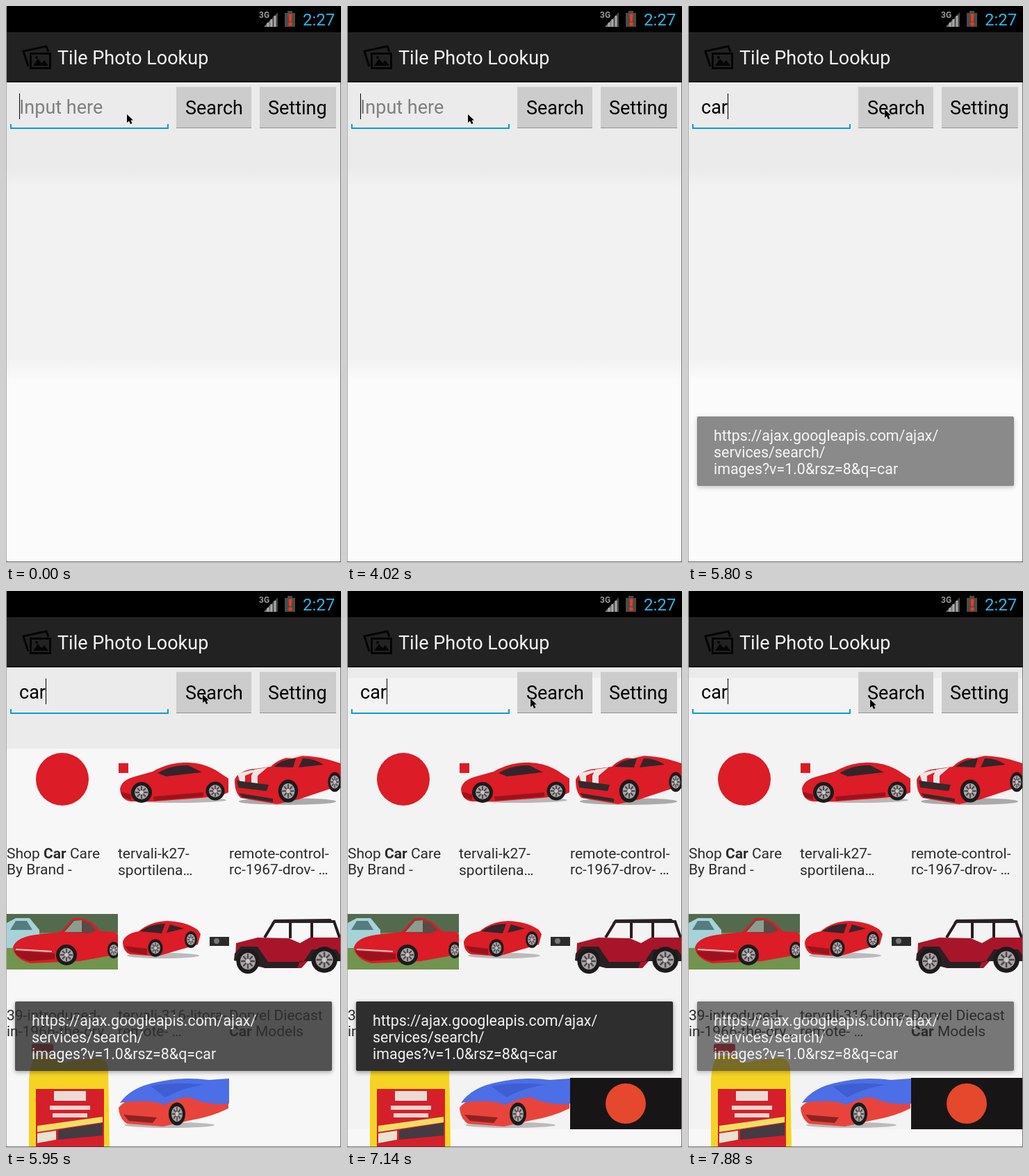
Animation of 482x802 px, one loop 8000 ms. Source, as an HTML page:

```html
<!DOCTYPE html>
<html lang="en">
<head>
<meta charset="utf-8">
<title>Image search</title>
<style>
  html, body { margin: 0; width: 100%; height: 100%; overflow: hidden; background: #fff; }
  svg { display: block; font: 27px Roboto, sans-serif; }
  .caption { font-size: 21px; fill: #2b2b2b; }
  .caption .bold { font-weight: 700; }
  .toast { font-size: 21.4px; fill: #f2f2f2; }
  .button { fill: #ccc; }
  .red { fill: #dc1c26; }
  .glass { fill: #33252a; }
  .shade { fill: #9c121c; }
</style>
</head>
<body>
<svg width="482" height="802" viewBox="0 0 482 802">
  <defs>
    <linearGradient id="page" x2="0" y2="1">
      <stop offset=".18" stop-color="#ebebeb"/>
      <stop offset=".217" stop-color="#f2f2f2"/>
      <stop offset=".577" stop-color="#f2f2f2"/>
      <stop offset=".623" stop-color="#fbfbfb"/>
    </linearGradient>
    <linearGradient id="signal">
      <stop offset=".5" stop-color="#777"/>
      <stop offset=".5" stop-color="#444"/>
    </linearGradient>
    <filter id="shadow" x="-5%" y="-10%" width="110%" height="125%">
      <feDropShadow dx="0" dy="2" stdDeviation="3" flood-opacity=".4"/>
    </filter>
    <g id="wheel">
      <circle r="15" fill="#1c1a1b"/>
      <circle r="10" fill="#a9a4a6"/>
      <path d="M-9 0H9M0-9V9M-6-6L6 6M-6 6L6-6" stroke="#4b4648" stroke-width="2"/>
      <circle r="3" fill="#c9c5c6"/>
    </g>
    <clipPath id="screen"><rect x="1" y="110" width="480" height="690"/></clipPath>
    <clipPath id="meadow"><rect x="1" y="465" width="160" height="80"/></clipPath>
  </defs>

  <rect y="110" width="482" height="690" fill="url(#page)"/>

  <g id="results" clip-path="url(#screen)">
    <rect x="1" y="227" width="480" height="573" fill="#f7f7f7"/>
    <rect id="backdrop" x="1" y="125" width="480" height="650" fill="#f3f3f3"/>

    <circle class="red" cx="81" cy="271" r="38"/>

    <!-- sports coupe -->
    <rect class="red" x="162" y="248" width="14" height="14"/>
    <ellipse cx="245" cy="301" rx="72" ry="4" fill="#b9b5b5"/>
    <path class="red" d="M164 285Q166 272 186 267L211 260Q235 246 262 247Q290 248 311 264L320 270V290L306 296L214 303H180Q165 301 164 285Z"/>
    <path class="glass" d="M218 262Q238 250 262 251L282 261L230 267Z"/>
    <path class="shade" d="M212 296L284 290V296L213 302ZM165 289L180 293V301L168 297Z"/>
    <use href="#wheel" x="195" y="290"/>
    <use href="#wheel" transform="translate(301 288) scale(.9)"/>

    <!-- striped muscle car -->
    <ellipse cx="405" cy="303" rx="70" ry="5" fill="#aaa"/>
    <path class="red" d="M329 272Q332 262 350 257L381 253Q394 239 421 237Q450 237 481 248V280L421 300L390 307L338 298Q329 291 329 272Z"/>
    <path class="glass" d="M385 253Q397 242 417 241L413 254ZM421 254L427 241Q444 241 457 250Z"/>
    <path d="M333 263L352 258H362L344 266V276H337ZM357 257L376 254L362 266V278H353V266ZM398 240L421 236H432L412 241Z" fill="#f0e5e5"/>
    <path d="M332 273L378 279L375 288L334 283ZM335 291L384 299V304L340 297Z" fill="#332a2b"/>
    <use href="#wheel" transform="translate(406 288) scale(.95 1.1)"/>
    <use href="#wheel" transform="translate(473 275) scale(.65 .95)"/>

    <!-- roadster on grass -->
    <g clip-path="url(#meadow)">
      <rect x="1" y="465" width="160" height="80" fill="#71944f"/>
      <rect x="1" y="465" width="160" height="27" fill="#536b4c"/>
      <path d="M1 478L14 471H34L48 488V514H1Z" fill="#a6d3d7"/>
      <path d="M6 488L14 475H30L38 488Z" fill="#557d80"/>
      <path class="red" d="M10 513Q14 499 42 495L78 491L97 471Q120 468 136 490L157 491L161 495V523L106 533L35 536Q12 530 10 513Z"/>
      <path d="M82 491L97 474Q118 471 130 489L118 493Z" fill="#594a44"/>
      <path d="M84 491L98 475L109 474V491Z" fill="#8b9d8e"/>
      <path class="shade" d="M12 518L70 522V530L34 533Q16 528 12 518Z"/>
      <path d="M14 516L66 519" stroke="#d6cccb" stroke-width="2"/>
      <use href="#wheel" x="87" y="524"/>
      <use href="#wheel" transform="translate(155 517) scale(.6 .8)"/>
    </g>

    <!-- toy car and its remote -->
    <ellipse cx="226" cy="525" rx="52" ry="4" fill="#bbb"/>
    <path class="red" d="M168 505Q172 493 191 490Q207 476 232 475Q259 476 276 488L280 494L276 509L218 526L178 523Q168 519 168 505Z"/>
    <path class="glass" d="M193 490Q208 479 229 479L224 493ZM231 492L236 480L256 486Z"/>
    <path class="shade" d="M170 511L203 515V524L178 520Z"/>
    <use href="#wheel" transform="translate(215 514) scale(.7 .85)"/>
    <use href="#wheel" transform="translate(266 502) scale(.6 .8)"/>
    <rect x="293" y="498" width="28" height="13" fill="#2c2b2c"/>
    <circle cx="303" cy="504" r="4" fill="#777"/>

    <!-- off-roader -->
    <path d="M372 499L386 476H472L480 499M409 476V500M440 476V500" fill="none" stroke="#271c1e" stroke-width="4"/>
    <path d="M386 473L467 472L473 478H382Z" fill="#292225"/>
    <path d="M331 507L362 499L407 500L423 507L437 499H481V527L435 532L425 543H374L330 529Z" fill="#a8152a"/>
    <path d="M329 522L338 512H362L377 534H428L440 516H475L481 524V533H423L419 543H373L328 532Z" fill="#2a2023"/>
    <use href="#wheel" transform="translate(348 533) scale(1.1 1.2)"/>
    <use href="#wheel" transform="translate(458 531) scale(1.25)"/>

    <!-- yellow bottle -->
    <path d="M33 800V704Q34 682 42 669H66Q78 684 96 676L132 672Q146 674 147 688L149 800Z" fill="#f5d323"/>
    <rect x="37" y="652" width="31" height="13" rx="3" fill="#c92732"/>
    <rect x="43" y="717" width="98" height="83" fill="#d5202b"/>
    <rect x="69" y="720" width="46" height="14" fill="#e9dcd4"/>
    <path d="M63 741H121V747H63ZM67 752H117V758H67Z" fill="#edd5d0"/>
    <path d="M45 770L139 757V765L45 779Z" fill="#f1df63"/>
    <path d="M75 776L139 766V784L75 790Z" fill="#443a41"/>
    <path d="M45 781L72 777V790L45 795Z" fill="#e9e3d2"/>

    <!-- car under a cover -->
    <ellipse cx="235" cy="769" rx="65" ry="4" fill="#bbb"/>
    <path d="M162 744Q172 731 199 726L264 722L320 730V745Q296 757 266 762L226 771L174 767Q163 760 162 744Z" fill="#e9443b"/>
    <path d="M164 737Q180 714 218 707Q252 699 292 704L321 702V738Q293 742 264 729Q244 730 229 740Q204 731 164 737Z" fill="#4c6ee7"/>
    <path d="M208 713Q242 706 286 711Q258 714 229 729Z" fill="#3e5ed2"/>
    <path d="M169 754L217 758L211 766L177 763Z" fill="#8e2225"/>
    <use href="#wheel" transform="translate(246 753) scale(.8 1.1)"/>

    <g id="lateResult">
      <rect x="321" y="701" width="160" height="74" fill="#181516"/>
      <circle cx="401" cy="738" r="29" fill="#e5482c"/>
    </g>

    <g class="caption">
      <text x="1" y="385">Shop <tspan class="bold">Car</tspan> Care</text>
      <text x="1" y="408">By Brand -</text>
      <text x="161" y="385">tervali-k27-</text>
      <text x="161" y="409">sportilena…</text>
      <text x="321" y="385">remote-control-</text>
      <text x="321" y="408">rc-1967-drov- …</text>
      <text x="1" y="618">39-introduced-</text>
      <text x="1" y="641">in-1966-the-orv…</text>
      <text x="161" y="618">tervali-316-litora-</text>
      <text x="161" y="641">remote- …</text>
      <text x="321" y="618">Dorvel Diecast</text>
      <text x="321" y="641"><tspan class="bold">Car</tspan> Models</text>
    </g>
  </g>

  <!-- status bar -->
  <rect width="482" height="38" fill="#000"/>
  <text x="364" y="17" font-size="12" font-weight="700" fill="#999">3G</text>
  <path d="M371 30L391 9V30Z" fill="url(#signal)"/>
  <path d="M377 24V30M382 19V30M387 14V30" stroke="#aaa" stroke-width="3"/>
  <path d="M401 10H405V7H412V10H416V30H401Z" fill="#4b4b4b"/>
  <path d="M407 12H411L410 22H408ZM407 24H411V28H407Z" fill="#f03b18" stroke="#f03b18"/>
  <text x="427" y="28" font-size="24" fill="#33b5e5">2:27</text>

  <!-- action bar -->
  <rect y="38" width="482" height="72" fill="#222"/>
  <path d="M0 38.5H482" stroke="#2c2c2c"/>
  <path d="M0 109H482" stroke="#141414" stroke-width="2"/>
  <g fill="none" stroke="#050505" stroke-width="3">
    <path d="M32 87L25 65L58 58L61 66"/>
    <rect x="35.5" y="68.5" width="28" height="21"/>
  </g>
  <path d="M39 86L46 76L51 82L55 78L61 86Z" fill="#050505"/>
  <circle cx="44" cy="74" r="2" fill="#050505"/>
  <text x="74" y="84" fill="#f3f3f3">Tile Photo Lookup</text>

  <!-- search form -->
  <path d="M7 170V176H233V170" fill="none" stroke="#0d9bcc" stroke-width="2"/>
  <text id="hint" x="19" y="155" fill="#808080">Input here</text>
  <text id="query" x="19" y="155"></text>
  <rect id="caret" y="126" width="1" height="37"/>
  <g class="button">
    <rect x="245" y="116" width="108" height="60" rx="1"/>
    <rect x="365" y="116" width="110" height="60" rx="1"/>
  </g>
  <path d="M245 175.5H353M365 175.5H475" stroke="#929292"/>
  <path d="M245 116.5H353M365 116.5H475" stroke="#dadada"/>
  <text x="258" y="156">Search</text>
  <text x="377" y="156">Setting</text>

  <g id="toast" class="toast">
    <rect x="13" y="591" width="456" height="100" rx="2" fill="#2e2e2e" filter="url(#shadow)"/>
    <text x="37" y="626">https://ajax.googleapis.com/ajax/</text>
    <text x="37" y="650">services/search/</text>
    <text x="37" y="674">images?v=1.0&amp;rsz=8&amp;q=car</text>
  </g>

  <path id="pointer" d="M0 0V12L3 9.5L5 14L7.5 13L5.5 8.5H9Z" stroke="#fff" stroke-width=".8" paint-order="stroke"/>

  <!-- window edges -->
  <path d="M.5 0V800" stroke="#aaa"/>
  <path d="M481.5 110V800" stroke="#777"/>
  <path d="M0 800.5H482" stroke="#444"/>
</svg>
<script>
  const DURATION = 8000;
  const TICKS = [0, 450, 890, 1490, 1940, 2530, 2980, 3420, 4020, 4320, 4460, 4760,
    5060, 5200, 5350, 5500, 5650, 5800, 5950, 6100, 6250,
    6690, 6840, 6990, 7140, 7290, 7430, 7580, 7730, 7880];
  const BLINKS = [450, 890, 1490, 1940, 2530, 2980, 3420, 4020, 5350, 5800, 6250, 6690, 7290, 7730];
  const KEYSTROKES = [4320, 4460, 4760];
  const POINTER_PATH = [[0, 174, 156], [4900, 174, 156], [5350, 283, 149], [6250, 283, 149],
    [7140, 264, 155], [7730, 262, 156], [DURATION, 262, 156]];

  const el = id => document.getElementById(id);
  const [results, backdrop, lateResult, hint, query, caret, toast, pointer] =
    ['results', 'backdrop', 'lateResult', 'hint', 'query', 'caret', 'toast', 'pointer'].map(el);
  const passed = (times, t) => times.filter(time => time <= t).length;
  const progress = (t, from, to) => Math.min(1, Math.max(0, (t - from) / (to - from)));
  const show = (node, visible) => node.setAttribute('visibility', visible ? 'inherit' : 'hidden');

  function pointerAt(t) {
    const next = POINTER_PATH.findIndex(([time]) => time > t);
    const [t0, x0, y0] = POINTER_PATH[next - 1];
    const [t1, x1, y1] = POINTER_PATH[next];
    const p = progress(t, t0, t1);
    return [x0 + (x1 - x0) * p, y0 + (y1 - y0) * p].map(Math.round);
  }

  function render(t) {
    const typed = 'car'.slice(0, passed(KEYSTROKES, t));
    query.textContent = typed;
    show(hint, !typed);
    caret.setAttribute('x', 19 + Math.round(typed ? query.getComputedTextLength() : 0));
    show(caret, passed(BLINKS, t) % 2 === 0);

    show(results, t >= 5950);
    show(lateResult, t >= 6250);
    show(backdrop, t >= 6250);

    toast.setAttribute('opacity', progress(t, 5500, 6050) * (1 - progress(t, 7640, 8280)));
    pointer.setAttribute('transform', `translate(${pointerAt(t)})`);
  }

  function loop() {
    const t = performance.now() % DURATION;
    render(TICKS[passed(TICKS, t) - 1]);
    requestAnimationFrame(loop);
  }
  loop();
</script>
</body>
</html>
```
